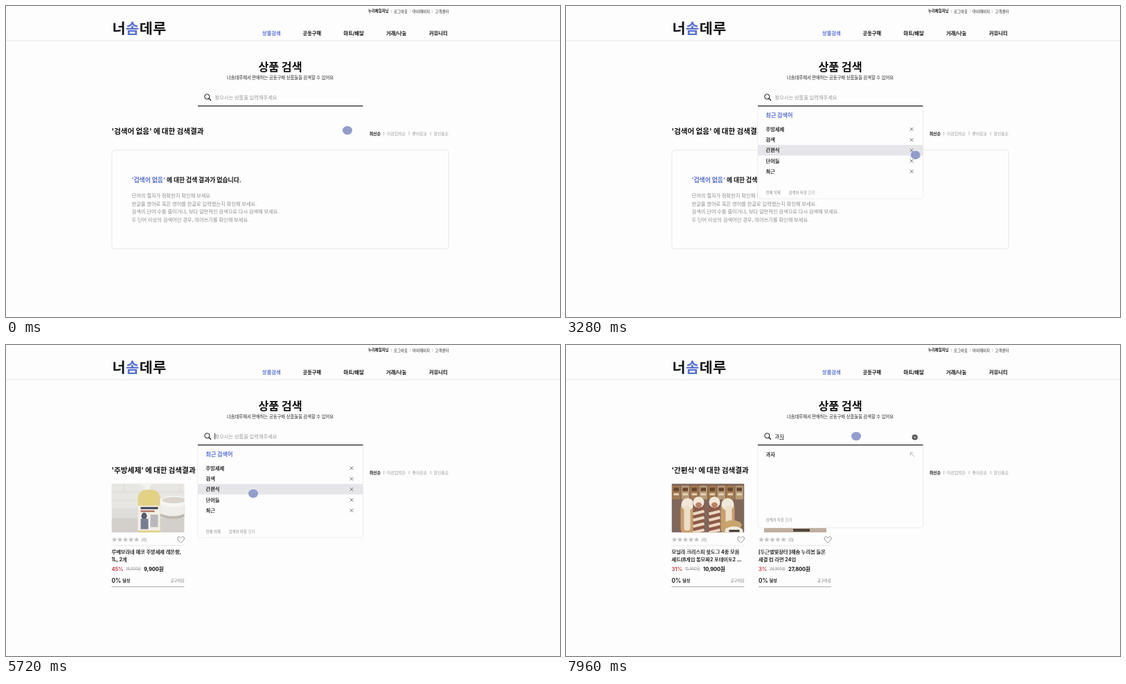
Write an HTML page with a canvas that moves like this. It is 800 px wide and 450 px high and loops after 8 s.

```html
<!DOCTYPE html>
<html lang="ko">
<head>
<meta charset="utf-8">
<title>상품 검색</title>
<style>
html, body { margin: 0; width: 100%; height: 100%; overflow: hidden; background: #fdfdfd; }
canvas { display: block; width: 800px; height: 450px; }
</style>
</head>
<body>
<canvas id="stage"></canvas>
<script>
const LOOP = 8000;
const FONT = "Inter, 'Noto Sans CJK KR', 'Noto Sans CJK', sans-serif";
const HANGUL_SCALE = 0.94;
const BG = '#fdfdfd', INK = '#111', BLUE = '#5570d6', GREY = '#999', EDGE = '#e9e9e9';
const BRAND = '너솜데루';
const ROW_TOP = 170.5, ROW_H = 15.28;

const canvas = document.getElementById('stage');
const dpr = window.devicePixelRatio || 1;
canvas.width = 800 * dpr;
canvas.height = 450 * dpr;
const ctx = canvas.getContext('2d');

// y is the optical middle of the line; returns the advance width
function text(s, x, y, size, { weight = 400, color = INK, align = 'left', latin = false } = {}) {
  const px = latin ? size : size * HANGUL_SCALE;
  ctx.font = `${weight} ${px}px ${FONT}`;
  ctx.letterSpacing = latin ? -0.01 * px + 'px' : '0px';
  ctx.wordSpacing = latin ? '0px' : -0.03 * px + 'px';
  const w = ctx.measureText(s).width;
  const left = align === 'center' ? x - w / 2 : align === 'right' ? x - w : x;
  ctx.fillStyle = color;
  ctx.fillText(s, left, y + px * 0.37);
  // Hangul has no medium face, so thicken the outline a little
  if (weight === 500) {
    ctx.strokeStyle = color;
    ctx.lineWidth = px * 0.03;
    ctx.strokeText(s, left, y + px * 0.37);
  }
  return w;
}

function rect(x, y, w, h, color) {
  ctx.fillStyle = color;
  ctx.fillRect(x, y, w, h);
}

function box(x, y, w, h, r, fill, stroke) {
  ctx.beginPath();
  ctx.roundRect(x, y, w, h, r);
  if (fill) { ctx.fillStyle = fill; ctx.fill(); }
  if (stroke) { ctx.strokeStyle = stroke; ctx.lineWidth = 1; ctx.stroke(); }
}

function oval(x, y, rx, ry, color) {
  ctx.beginPath();
  ctx.ellipse(x, y, rx, ry, 0, 0, Math.PI * 2);
  ctx.fillStyle = color;
  ctx.fill();
}

function line(color, width, ...p) {
  ctx.beginPath();
  ctx.moveTo(p[0], p[1]);
  for (let i = 2; i < p.length; i += 2) ctx.lineTo(p[i], p[i + 1]);
  ctx.strokeStyle = color;
  ctx.lineWidth = width;
  ctx.stroke();
}

function cross(x, y, r, color, width = 0.8) {
  line(color, width, x - r, y - r, x + r, y + r);
  line(color, width, x + r, y - r, x - r, y + r);
}

// Pointer path: time, x, y
const PATH = [
  [0, 493, 180], [320, 345, 140], [480, 335, 140], [840, 312, 221], [2500, 312, 221],
  [3040, 506, 216], [3240, 506, 216], [4000, 342, 183], [4200, 342, 183],
  [4600, 512, 158], [5000, 462, 142], [5240, 456, 141], [5680, 357, 215],
  [5880, 357, 215], [6060, 357, 198], [6200, 357, 198], [6720, 419, 132], [LOOP, 419, 132]
];

function pointer(t) {
  const i = PATH.findIndex((k, n) => n && t < k[0]);
  const a = PATH[i - 1], b = PATH[i];
  const u = (t - a[0]) / (b[0] - a[0]), e = u * u * (3 - 2 * u);
  return [a[1] + (b[1] - a[1]) * e, a[2] + (b[2] - a[2]) * e];
}

// Typed value by start time
const TYPED = [
  [0, ''], [5880, '간편식'], [7160, '간편'], [7260, '간'], [7360, ''],
  [7500, 'ㄱ'], [7600, '고'], [7700, '과'], [7820, '괒'], [7900, '과자']
];
const typedAt = t => TYPED.filter(k => k[0] <= t).pop()[1];

function header() {
  [[BRAND[0], 153.5], [BRAND[1], 173], [BRAND[2], 192.7], [BRAND[3], 212.3]]
    .forEach(([s, x], i) => text(s, x, 32.4, 22, { weight: 700, color: i === 1 ? BLUE : INK }));

  text('누리체험자님', 523, 7.5, 5.7, { weight: 700 });
  [['로그아웃', 560], ['마이페이지', 587], ['고객센터', 619.5]]
    .forEach(([s, x]) => text(s, x, 7.5, 5.8, { color: '#222' }));
  [556, 583.7, 615.7].forEach(x => rect(x, 5.2, 0.5, 4.8, '#aaa'));

  [['상품검색', 370], ['공동구매', 428.5], ['마트/배달', 487.5], ['거래/나눔', 549], ['커뮤니티', 611]]
    .forEach(([s, x], i) => text(s, x, 39.5, 7.7, { weight: 700, color: i ? INK : BLUE }));
  rect(0, 49.5, 800, 1, '#e6e6e6');
}

function searchBar(t, value) {
  text('상품 검색', 396, 88, 17.3, { weight: 700, align: 'center' });
  text(BRAND + '에서 판매하는 공동구매 상품들을 검색할 수 있어요', 396, 104, 6.7, { color: '#222', align: 'center' });

  ctx.beginPath();
  ctx.arc(290.4, 131.2, 3.6, 0, Math.PI * 2);
  ctx.strokeStyle = INK;
  ctx.lineWidth = 1;
  ctx.stroke();
  line(INK, 1.3, 293, 133.8, 296, 136.8);

  let w = 0;
  if (value) {
    w = text(value, 301.5, 132, 7.7);
    oval(503.7, 133.5, 4.1, 4.1, '#555');
    cross(503.7, 133.5, 1.5, '#fff');
  } else {
    text('찾으시는 상품을 입력해주세요', 301.5, 132, 7.7, { color: GREY });
  }
  const composing = value && t >= 7500;
  if (composing) rect(301.5 + w - 6.6, 136.4, 6.5, 0.7, INK);
  const start = t < 4200 ? 360 : t < 5880 ? 5240 : 6760;
  const focused = t >= start && !composing;
  if (focused && (t - start) % 1060 < 530) rect(301.3 + w, 127.5, 0.8, 9, INK);
  rect(277, 144, 238.5, 1.3, '#2c2c2c');
}

function resultHead(query) {
  text(`'${query}' 에 대한 검색결과`, 152.5, 181.3, 11.3, { weight: 700 });
  text('최신순', 525, 184.5, 6.2, { weight: 700 });
  [['마감임박순', 550], ['좋아요순', 586.5], ['할인율순', 617.5]]
    .forEach(([s, x]) => text(s, x, 184.5, 6.3, { color: GREY }));
  [545.5, 581.8, 612.8].forEach(x => rect(x, 182, 0.6, 5, '#888'));
}

function emptyPanel() {
  box(152.8, 208.5, 486.7, 143, 4, null, EDGE);
  const w = text("'검색어 없음'", 181.5, 251.3, 9.4, { weight: 700, color: BLUE });
  text(' 에 대한 검색 결과가 없습니다.', 181.5 + w, 251.3, 9.4, { weight: 700 });
  ['단어의 철자가 정확한지 확인해 보세요.',
   '한글을 영어로 혹은 영어를 한글로 입력했는지 확인해 보세요.',
   '검색의 단어 수를 줄이거나, 보다 일반적인 검색으로 다시 검색해 보세요.',
   '두 단어 이상의 검색어인 경우, 띄어쓰기를 확인해 보세요.'
  ].forEach((s, i) => text(s, 181.5, 274.6 + i * 11.55, 7.7, { color: '#8c8c8c' }));
}

function soapPhoto() {
  rect(0, 0, 105, 71, '#dfddda');
  rect(0, 0, 105, 36, '#e8e6e3');
  [12, 24].forEach(y => rect(0, y, 105, 0.6, '#d2d0cd'));
  [18, 58, 98].forEach(x => rect(x, 0, 0.6, 12, '#d2d0cd'));
  rect(0, 50, 105, 21, '#d3d0cc');
  oval(89, 40, 25, 11, '#bdb9b2');
  oval(88, 36, 24, 11, '#f0eeea');
  oval(90, 26, 21, 8, '#f7f6f3');
  oval(90, 24, 17, 4.5, '#d9d5cd');
  rect(47, 0, 8, 9, '#f4f2ee');
  rect(42, 0, 16, 4, '#f4f2ee');
  box(38, 9, 32, 62, [12, 12, 2, 2], '#e3d184');
  rect(38, 32, 32, 36, '#f2efe6');
  rect(42, 34, 25, 3, '#3d4050');
  rect(42, 39, 20, 2, '#a65c50');
  oval(47, 47, 4, 5, '#565b70');
  rect(42, 51, 11, 15, '#777d91');
  rect(56, 45, 11, 18, '#b8b8bc');
}

function hotdogPhoto() {
  rect(0, 0, 105, 71, '#80675a');
  for (let i = 0; i < 8; i++) {
    box(1 + i * 13, 3, 11.5, 20, 1, i % 2 ? '#b59a75' : '#a3794f');
    rect(3 + i * 13, 6, 7.5, 5, '#69452f');
    rect(3 + i * 13, 14, 7.5, 3, '#e4d5b6');
  }
  [23, 81].forEach((x, n) => {
    box(x - 10, 26, 20, 48, 9, '#c99f6d');
    oval(x, 30, 9, 9, '#f0e8d8');
    box(x - 5 + n * 2, 32, 9, 36, 4, '#eadfc8');
  });
  [39, 62].forEach(x => {
    box(x - 8, 20, 16, 54, 8, '#8d5a48');
    oval(x, 27, 8, 8, '#f2e8da');
    oval(x, 31, 4.5, 4, '#b98268');
    for (let y = 41; y < 71; y += 9) line('#ecd8c2', 4, x - 8, y + 3, x + 8, y - 1);
  });
  oval(88, 60, 13, 7, '#c9a46d');
  oval(90, 69, 13, 7, '#f1ece0');
  rect(83, 67, 15, 3, '#3c322c');
}

function noodlePhoto() {
  // Bowl colours per shelf, left to right
  const shelves = [
    ['#6e5f55', '#4f4640', '#a8514a'], ['#5b4a42', '#6d4a3d', '#b9584f'],
    ['#d8c3b8', '#b5413f', '#c96a5f'], ['#a93f3d', '#c2554d', '#7d7f8e'],
    ['#8a4f40', '#7b5c3e', '#d8c37c']
  ];
  rect(8, 0, 88, 71, '#eee9e4');
  shelves.forEach((colors, r) => {
    const y = r * 12.5;
    const inset = r < 2 ? 3 : 0;
    rect(8 - inset / 3, y + 4, 88 - inset, 10, '#6f5b52');
    for (let i = 0; i < 6; i++) {
      const x = 7 + (r % 2) * 2 + i * 15 - r * 0.3, top = y + (i % 3);
      ctx.beginPath();
      ctx.moveTo(x, top);
      ctx.lineTo(x + 15, top);
      ctx.lineTo(x + 12.5, top + 12);
      ctx.lineTo(x + 2.5, top + 12);
      ctx.fillStyle = colors[Math.floor(i / 2)];
      ctx.fill();
      oval(x + 7.5, top + 1, 7, 1.6, '#e9ded4');
      rect(x + 4, top + 5, 7, 2.4, '#e3cdb8');
      rect(x + 5, top + 8.5, 5, 1.2, '#4b3a35');
    }
  });
  rect(8, 64, 90, 7, '#bfae9f');
  rect(50, 65.5, 24, 4, '#51463f');
}

function star(x, y, r) {
  ctx.beginPath();
  for (let i = 0; i < 10; i++) {
    const a = i * Math.PI / 5 - Math.PI / 2, d = i % 2 ? r * 0.45 : r;
    ctx.lineTo(x + Math.cos(a) * d, y + Math.sin(a) * d);
  }
  ctx.fillStyle = '#c4c4c4';
  ctx.fill();
}

function heart(x, y) {
  ctx.beginPath();
  ctx.moveTo(x, y + 4.4);
  ctx.bezierCurveTo(x - 9, y - 1.8, x - 3.8, y - 7, x, y - 2.5);
  ctx.bezierCurveTo(x + 3.8, y - 7, x + 9, y - 1.8, x, y + 4.4);
  ctx.strokeStyle = '#777';
  ctx.lineWidth = 0.8;
  ctx.stroke();
}

function card(x, c) {
  ctx.save();
  ctx.translate(x, 200.5);
  ctx.beginPath();
  ctx.rect(0, 0, 105, 70.7);
  ctx.clip();
  c.photo();
  ctx.restore();

  for (let i = 0; i < 5; i++) star(x + 4 + i * 8, 281.8, 4);
  text('(0)', x + 43, 281.5, 6, { color: '#888', latin: true });
  heart(x + 100, 281.7);
  rect(x, 289.7, 105, 0.7, '#ddd');
  c.title.forEach((s, i) => text(s, x, 299.2 + i * 11.5, 7.7, { weight: 500 }));

  const bold = { weight: 700, latin: true };
  text(c.off, x, 324, 7.5, { ...bold, color: '#c2424c' });
  const w = text(c.was, x + c.at[0], 324, 5.5, { color: GREY, latin: true });
  rect(x + c.at[0], 324, w, 0.5, GREY);
  text(c.now, x + c.at[1], 324, 7.5, bold);

  text('0%', x, 340.8, 8.3, { weight: 600, latin: true });
  text('달성', x + 15.7, 341.2, 6.5, { weight: 500 });
  text('공구마감', x + 105, 341.3, 5.8, { color: '#777', align: 'right' });
  rect(x, 349.2, 105, 1.3, '#b9b9b9');
}

const SOAP = {
  photo: soapPhoto, title: ['루메보라네 에코 주방세제 레몬향,', '1L, 2개'],
  off: '45%', was: '18,000원', now: '9,900원', at: [20.5, 46.5]
};
const HOTDOG = {
  photo: hotdogPhoto, title: ['모닐라 크리스피 핫도그 4종 모음', '세트(8개입 통모짜2 포테이토2 ...'],
  off: '31%', was: '15,900원', now: '10,900원', at: [19.3, 45.5]
};
const NOODLE = {
  photo: noodlePhoto, title: ['[두근별빛장터 ]해솜 누리봄 들온', '새결 컵 라면 24입'],
  off: '3%', was: '28,900원', now: '27,800원', at: [15.7, 43]
};

function dropBox(bottom) {
  box(277, 145.5, 238.5, bottom - 145.5, [0, 0, 3, 3], BG, '#ededed');
}

function activeRow(t, y, count) {
  if (t >= 1680 && t < 2540) return [3, 4, 5, 0][Math.min(3, Math.floor((t - 1680) / 200))];
  const row = Math.floor((y - 8 - ROW_TOP) / ROW_H);
  return row >= 0 && row < count ? row : -1;
}

function recentList(t, py) {
  const items = ['주방세제', '검색', '검색한', '간편식', '단어들', '최근'];
  if (t >= 3160) items.splice(2, 1);
  dropBox(279);
  text('최근 검색어', 288.5, 158, 8.6, { weight: 700, color: BLUE });
  const active = activeRow(t, py, items.length);
  if (active >= 0) rect(277, ROW_TOP + active * ROW_H, 238.5, ROW_H, '#e6e6ea');
  items.forEach((s, i) => {
    const y = 178 + i * ROW_H;
    text(s, 288.5, y, 7.7, { weight: 500 });
    cross(499, y + 0.3, 2.4, '#555');
  });
  text('전체 삭제', 288.5, 269.6, 5.8, { color: '#888' });
  text('검색어 저장 끄기', 321.5, 269.6, 5.8, { color: '#888' });
}

function suggestions(value) {
  dropBox(264.5);
  if (value === '과자' || value === '간편식') {
    text(value, 288.5, 158.6, 7.7, { weight: 500 });
    line(GREY, 0.7, 503.5, 162, 497.3, 156);
    line(GREY, 0.7, 497.3, 159.5, 497.3, 156, 501, 156);
  }
  text('검색어 저장 끄기', 288.5, 253.2, 5.8, { color: '#888' });
}

function draw(t) {
  const [px, py] = pointer(t), value = typedAt(t);
  ctx.setTransform(dpr, 0, 0, dpr, 0, 0);
  rect(0, 0, 800, 450, BG);
  header();
  resultHead(t < 4180 ? '검색어 없음' : t < 5880 ? '주방세제' : '간편식');
  if (t < 4180) emptyPanel();
  else if (t < 5880) card(152.5, SOAP);
  else { card(152.5, HOTDOG); card(278, NOODLE); }

  const open = (t >= 360 && t < 4180) || (t >= 5240 && t < 5880) || t >= 6760;
  if (open) value ? suggestions(value) : recentList(t, py);
  searchBar(open ? t : -1, value);
  oval(px, py, 7, 6.2, '#929dcd');
}

const begin = performance.now();
function tick() {
  draw((performance.now() - begin) % LOOP);
  requestAnimationFrame(tick);
}
tick();
</script>
</body>
</html>
```
